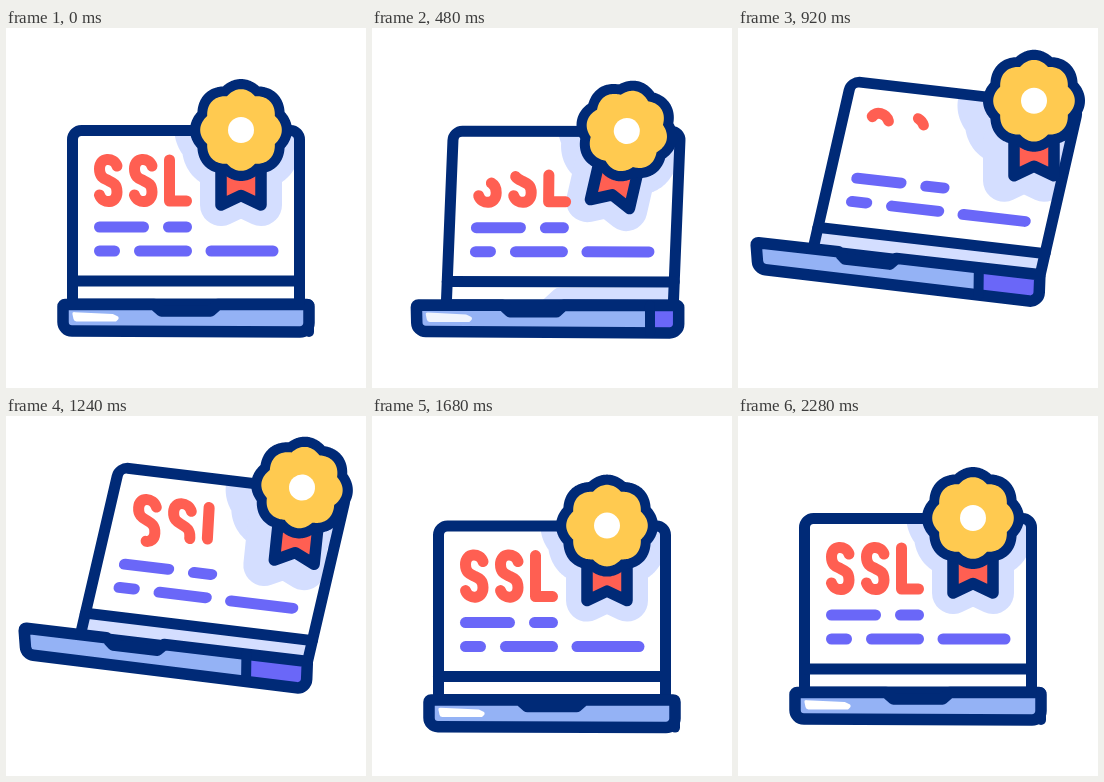
An HTML page with a canvas that plays this animation: 360x360 px, repeating every 2.32 s.

```html
<!DOCTYPE html>
<html lang="en">
<head>
<meta charset="utf-8">
<title>SSL certificate</title>
<style>
html, body { margin: 0; width: 100%; height: 100%; overflow: hidden; background: #fff; }
canvas { display: block; width: 100vw; height: 100vh; }
</style>
</head>
<body>
<canvas id="stage"></canvas>
<script>
const LOOP = 2320, STEP = 40;
const NAVY = '#002a77', RED = '#ff5f52', GOLD = '#ffca50', PURPLE = '#6a67f8',
      SHADE = '#d4deff', BLUE = '#94b2f5', WHITE = '#fff';

const canvas = document.getElementById('stage');
const ctx = canvas.getContext('2d');

const clamp = v => Math.min(1, Math.max(0, v));
const part = (t, from, to) => clamp((t - from) / (to - from));
const ease = (t, from, to) => {
  const s = part(t, from, to);
  return s * s * (3 - 2 * s);
};
const hump = (t, from, to) => Math.sin(Math.PI * part(t, from, to)) ** 2;
const mix = (a, b, k) => [a[0] + (b[0] - a[0]) * k, a[1] + (b[1] - a[1]) * k];

// turn: how far the laptop faces sideways; lift: how far it is raised and tipped.
function poseAt(t) {
  return {
    turn: ease(t, 320, 740) - ease(t, 1310, 1680),
    lift: (ease(t, 460, 740) - ease(t, 1280, 1520)) * (1 + .05 * ease(t, 800, 1240)),
    drop: 4 * hump(t, 0, 600) + 8 * hump(t, 1560, 1840),
    swing: 13 * hump(t, 200, 760) + 6 * hump(t, 1060, 1400)
      - 14 * hump(t, 1300, 1680) + 6 * hump(t, 1720, 2240)
  };
}

// Polygon with an optional corner radius as third item of a point.
function poly(pts) {
  const path = new Path2D(), n = pts.length;
  path.moveTo(...mix(pts[n - 1], pts[0], .5));
  pts.forEach((p, i) => {
    const next = pts[(i + 1) % n];
    if (p[2]) path.arcTo(p[0], p[1], next[0], next[1], p[2]);
    else path.lineTo(p[0], p[1]);
  });
  path.closePath();
  return path;
}

function line(a, b) {
  const path = new Path2D();
  path.moveTo(...a);
  path.lineTo(...b);
  return path;
}

function fill(path, color) {
  ctx.fillStyle = color;
  ctx.fill(path);
}

function stroke(path, color, width) {
  ctx.strokeStyle = color;
  ctx.lineWidth = width;
  ctx.stroke(path);
}

const S = x => `M${x} 138c-3 -9 -17.5 -9.5 -17.5 3c0 8 4.5 9.5 8.75 11.5` +
  's8.75 3.5 8.75 11.5c0 12.5 -14.5 12 -17.5 3';
const letters = [S(111), S(146), 'M163.5 132V173H180.5'].map(d => {
  const el = document.createElementNS('http://www.w3.org/2000/svg', 'path');
  el.setAttribute('d', d);
  return { path: new Path2D(d), size: el.getTotalLength() };
});
const bars = [[93.5, 137.5, 199], [162.5, 180.5, 199], [93.5, 108.5, 223],
  [133.5, 180.5, 223], [205, 267, 223]];

const frame = poly([[66.5, 102.5, 9], [293.5, 102.5, 9], [293.5, 276], [66.5, 276]]);
const pane = poly([[66.5, 102.5], [293.5, 102.5], [293.5, 253], [66.5, 253]]);
const chin = poly([[66.5, 253], [293.5, 253], [293.5, 276], [66.5, 276]]);

function scallop(radius) {
  const path = new Path2D();
  for (let i = 0; i < 240; i++) {
    const a = i * Math.PI / 120, r = radius - 4.2 * (1 - Math.abs(Math.cos(4 * a)));
    path.lineTo(r * Math.cos(a), r * Math.sin(a));
  }
  path.closePath();
  return path;
}
const flower = scallop(45.5), petals = scallop(40.8);
const ribbon = poly([[-20, 35], [20, 35], [20, 75], [0, 65.5], [-20, 75]]);
const hub = new Path2D();
hub.arc(0, 0, 13, 0, 7);

function drawLetters(t) {
  letters.forEach(({ path, size }, i) => {
    const swap = 780 + 80 * i;
    const from = t < swap ? part(t, swap - 590, swap - 60) : 0;
    const to = t < swap ? 1 : part(t, swap + 10, swap + 540);
    if (to - from < .01) return;
    ctx.setLineDash([(to - from) * size + .1, 999]);
    ctx.lineDashOffset = -from * size;
    stroke(path, RED, 11);
  });
  ctx.setLineDash([]);
}

function atMedal({ turn, lift, drop, swing }, paint) {
  ctx.save();
  ctx.translate(235 + 61 * turn, 102 - 29 * lift + drop);
  ctx.rotate(swing * Math.PI / 180);
  paint();
  ctx.restore();
}

function drawScreen(pose, t) {
  const { turn, lift, drop } = pose;
  const slope = .115 * lift, lean = -.12 * turn - .1 * lift;
  const world = ctx.getTransform();
  ctx.save();
  ctx.translate(93.5 + 34 * turn - 8.5 * lift, 199 - 48.5 * lift + drop);
  ctx.transform(1, slope, lean, 1 - slope / 4, 0, 0);
  ctx.translate(-93.5, -199);
  fill(frame, WHITE);

  ctx.save();
  ctx.clip(pane);
  ctx.setTransform(world);
  ctx.translate(-10 * turn, 5 * turn);
  atMedal(pose, () => {
    for (const shape of [flower, ribbon]) {
      fill(shape, SHADE);
      stroke(shape, SHADE, 42);
    }
  });
  ctx.restore();

  ctx.save();
  ctx.clip(chin);
  const edge = 316 - 500 * turn;
  fill(poly([[edge, 280], [edge + 22, 259, 8], [edge + 700, 253], [edge + 700, 280]]), SHADE);
  ctx.restore();

  for (const [a, b, y] of bars) stroke(line([a, y], [b, y]), PURPLE, 11);
  stroke(frame, NAVY, 11);
  stroke(line([66.5, 253], [293.5, 253]), NAVY, 11);

  // The letters stay more upright than the screen.
  ctx.transform(1, 0, -.75 * lean, 1, .75 * lean * 135, 0);
  drawLetters(t);
  ctx.restore();
}

function drawBase({ turn, lift, drop }) {
  const left = 57 - 39 * turn, right = 303 + 12 * turn - 13 * lift;
  const yl = 276.5 - 61.5 * lift + drop, yr = 276.5 - 29.5 * lift + drop;
  const tl = [left, yl], tr = [right, yr];
  const bl = [left + 2 * turn, yl + 26.5], br = [right - lift, yr + 27.5];
  const share = 1 - .215 * Math.pow(clamp(turn), .6);
  const top = mix(tl, tr, share), low = mix(bl, br, share);
  const notch = [[.37, 0], [.4, 6.5], [.6, 6.5], [.63, 0]].map(([u, dy]) => {
    const [x, y] = mix(tl, top, u);
    return [x, y + dy];
  });
  const body = poly([[...tl, 2], ...notch, [...tr, 2], [...br, 9], [...bl, 9]]);
  fill(body, BLUE);

  ctx.save();
  ctx.clip(body);
  fill(poly([top, tr, br, low]), PURPLE);
  ctx.globalAlpha = clamp(2 - 3.5 * turn);
  ctx.translate(...tl);
  fill(poly([[9, 7.5, 2], [50, 9.5, 2], [57, 13, 2], [53, 17, 2], [11, 17, 3]]), WHITE);
  ctx.restore();

  stroke(body, NAVY, 11.5);
  stroke(line(top, low), NAVY, 10);
}

function drawMedal(pose) {
  atMedal(pose, () => {
    fill(ribbon, RED);
    stroke(ribbon, NAVY, 11.5);
    fill(flower, NAVY);
    stroke(flower, NAVY, 11);
    fill(petals, GOLD);
    fill(hub, WHITE);
  });
}

function draw(t) {
  const pose = poseAt(t);
  const w = Math.round(innerWidth * devicePixelRatio);
  const h = Math.round(innerHeight * devicePixelRatio);
  if (canvas.width !== w || canvas.height !== h) {
    canvas.width = w;
    canvas.height = h;
  }
  ctx.setTransform(w / 360, 0, 0, h / 360, 0, 0);
  ctx.lineCap = ctx.lineJoin = 'round';
  ctx.fillStyle = WHITE;
  ctx.fillRect(0, 0, 360, 360);
  drawScreen(pose, t);
  drawBase(pose);
  drawMedal(pose);
}

const start = performance.now();
function tick() {
  const t = Math.max(0, performance.now() - start) % LOOP;
  draw(Math.floor(t / STEP) * STEP);
  requestAnimationFrame(tick);
}
tick();
</script>
</body>
</html>
```
